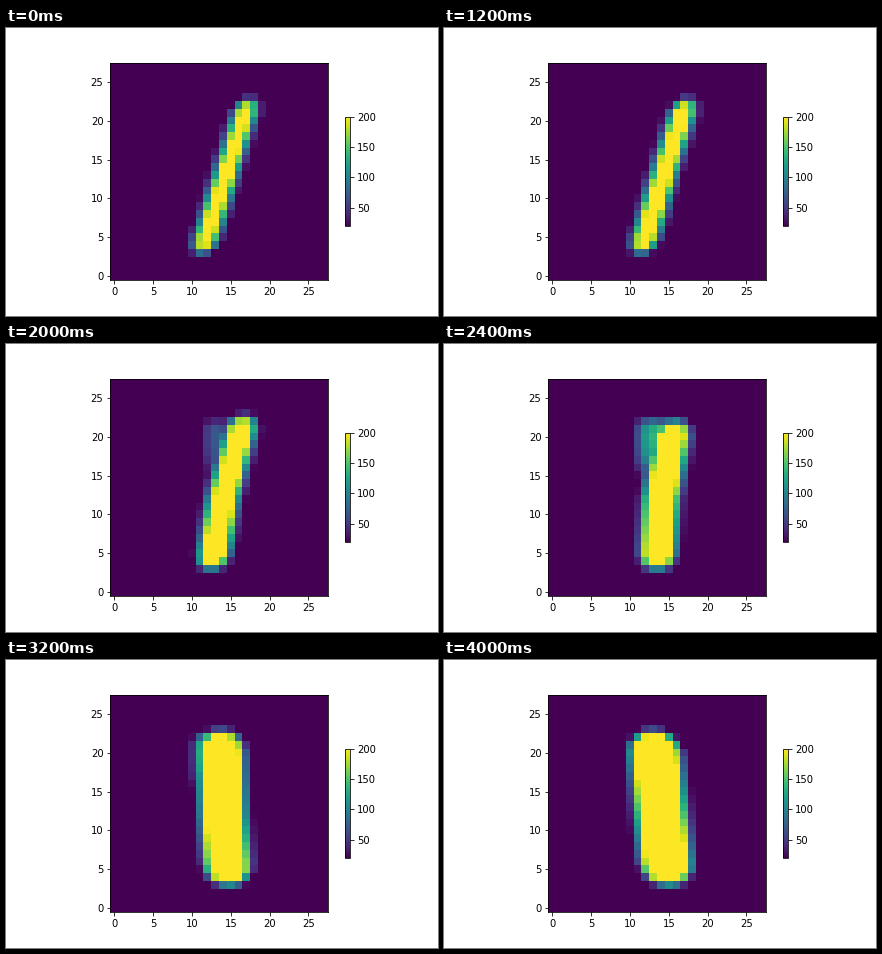
These frames come from a looping animation (432 by 288 pixels, 4.2 s). A matplotlib script:

```python
import matplotlib.pyplot as plt
import numpy as np
from matplotlib.animation import FuncAnimation

FRAMES, INTERVAL = 21, 200
PEAK = 280
MIDDLE_X, MIDDLE_Y = 14.05, 12
X, Y = np.meshgrid(np.arange(28), np.arange(28))


def ease(distance, soft):
    """Logistic step, used both for blurred edges and for timing."""
    return 1 / (1 + np.exp(-distance / soft))


def lean(frame, halfway):
    """Slope of the stroke as it swings upright and slightly past."""
    return 0.31 - 0.42 * ease(frame - halfway, 1.8)


def digit(frame):
    # The upper half swings a little later than the lower half.
    slope = np.where(Y < MIDDLE_Y, lean(frame, 11.3), lean(frame, 13.3))
    centre = MIDDLE_X + slope * (Y - MIDDLE_Y)
    width = 2.35 + 4 * ease(frame - 13, 2.8)
    stroke = PEAK * ease(X - centre + width / 2, 0.52)
    stroke *= ease(centre + width / 2 - X, 0.52)

    # Rounded ends.
    bulge = 0.12 * (X - centre) ** 2
    top = 22.5 - 0.7 * np.exp(-((frame - 12) / 1.5) ** 2)
    stroke *= np.where(Y > 19, ease(top - bulge - Y, 0.4), 1)
    stroke *= np.where(Y < 7, ease(Y - 3.2 - bulge, 0.4), 1)

    # A patch brightens at the upper left while the stroke widens.
    left = 10.9 + 2 * ease(9 - frame, 1.7)
    patch = PEAK * ease(frame - 11.7, 1.9) * ease(X - left, 0.6)
    patch *= ease(14.8 - X, 0.5) * ease(Y - 15.5, 1) * ease(22.1 - Y, 0.4)
    return np.maximum(stroke, patch)


fig, ax = plt.subplots(figsize=(6, 4), dpi=72,
                       gridspec_kw={"bottom": 0.125, "top": 0.88})
image = ax.imshow(digit(0), cmap="viridis", vmin=20, vmax=200,
                  origin="lower", interpolation="nearest")
fig.colorbar(image, ax=ax, shrink=0.5, ticks=range(50, 201, 50))
ax.set(xticks=range(0, 28, 5), yticks=range(0, 28, 5))


def update(frame):
    image.set_data(digit(frame))
    return [image]


animation = FuncAnimation(fig, update, frames=FRAMES, interval=INTERVAL,
                          repeat=True, repeat_delay=0)
plt.show()
```
